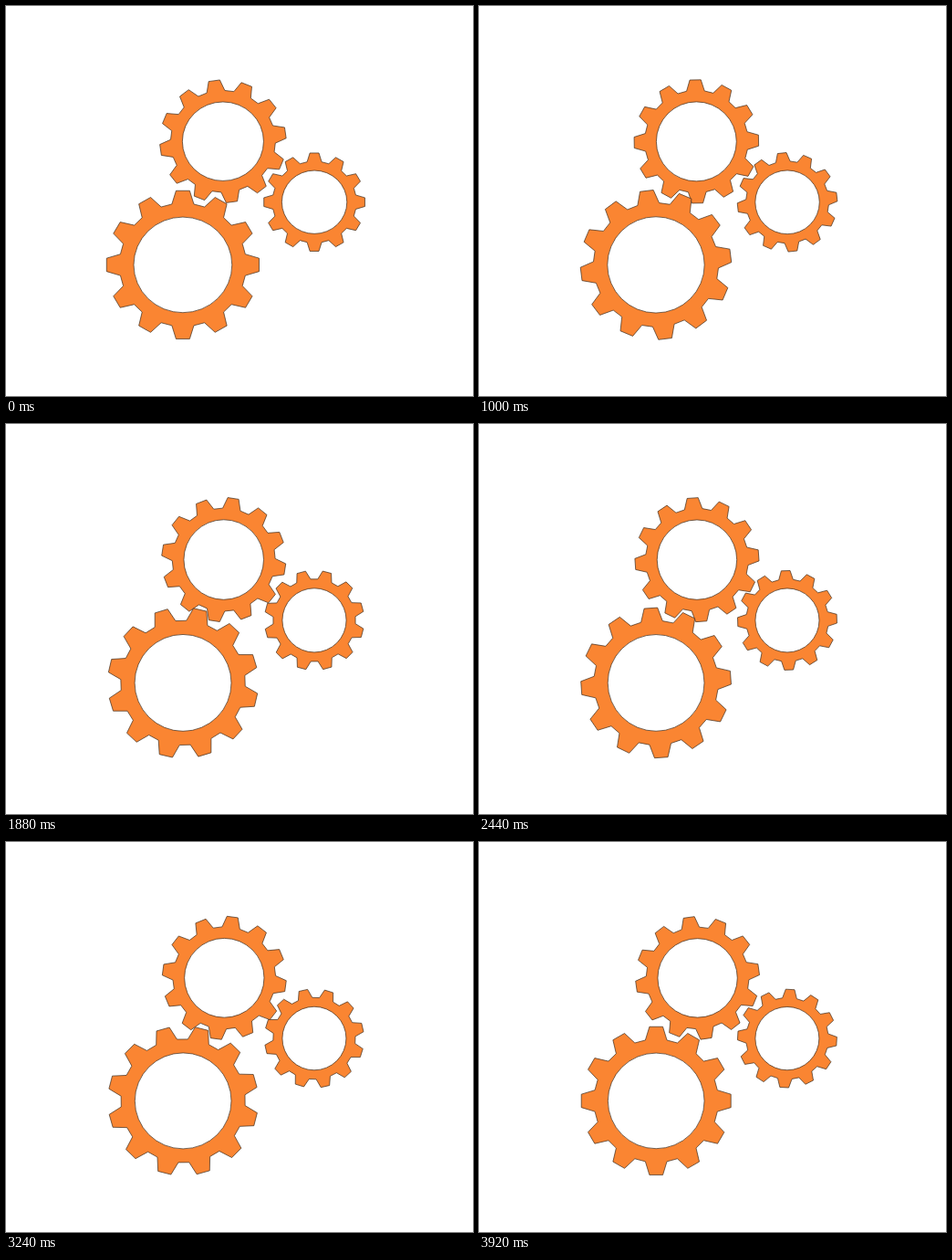
Write an HTML page with a canvas that moves like this. It is 512 px wide and 427 px high and loops after 3.96 s.

```html
<!DOCTYPE html>
<html lang="en">
<head>
<meta charset="utf-8">
<title>Gears</title>
<style>
  html, body { margin: 0; width: 100%; height: 100%; overflow: hidden; background: #fff; }
  canvas { display: block; }
</style>
</head>
<body>
<canvas id="stage" width="512" height="427"></canvas>
<script>
const ctx = document.getElementById('stage').getContext('2d');
const STEP = 40, STEPS = 99, TEETH = 12, HOLE = 0.642;
const rad = deg => deg * Math.PI / 180;

// Drift is the shift of the centre over one loop; turn is in degrees per loop.
const gears = [
  { x: 338.1, y: 214.7, driftX: -0.2, driftY: 0.4, radius: 54.5, start: 0, turn: 93.4 },
  { x: 237.9, y: 148.2, driftX: 1.7, driftY: 0.7, radius: 68, start: -8, turn: -90 },
  { x: 193.9, y: 283.4, driftX: 0.3, driftY: 0, radius: 82.3, start: 0, turn: 90 },
];

// Corners of one tooth: degrees from its middle, share of the radius.
const tooth = [[-10, 0.828], [-5.1, 1], [5.1, 1], [10, 0.828]];

function drawGear(gear, p) {
  const angle = gear.start + gear.turn * p;
  const scaleX = gear.radius * (1 + 0.02 * Math.exp(-p * 4.4));
  const scaleY = gear.radius * (1.002 - 0.012 * Math.cos(Math.PI * p) ** 2);
  const x = gear.x + gear.driftX * p;
  const y = gear.y + gear.driftY * p;

  ctx.beginPath();
  for (let i = 0; i < TEETH; i++) {
    for (const [offset, r] of tooth) {
      const a = rad(angle + i * 360 / TEETH + offset);
      ctx.lineTo(x + scaleX * r * Math.sin(a), y - scaleY * r * Math.cos(a));
    }
  }
  ctx.closePath();
  ctx.moveTo(x + scaleX * HOLE, y);
  ctx.ellipse(x, y, scaleX * HOLE, scaleY * HOLE, 0, 0, 2 * Math.PI);
  ctx.fill('evenodd');
  ctx.stroke();
}

function render(now) {
  const p = Math.floor(now / STEP) % STEPS / (STEPS - 1);
  ctx.fillStyle = '#fff';
  ctx.fillRect(0, 0, 512, 427);
  ctx.fillStyle = '#fa8532';
  ctx.strokeStyle = '#3c2b1e';
  ctx.lineWidth = 0.7;
  for (const gear of gears) drawGear(gear, p);
  requestAnimationFrame(render);
}
render(0);
</script>
</body>
</html>
```
